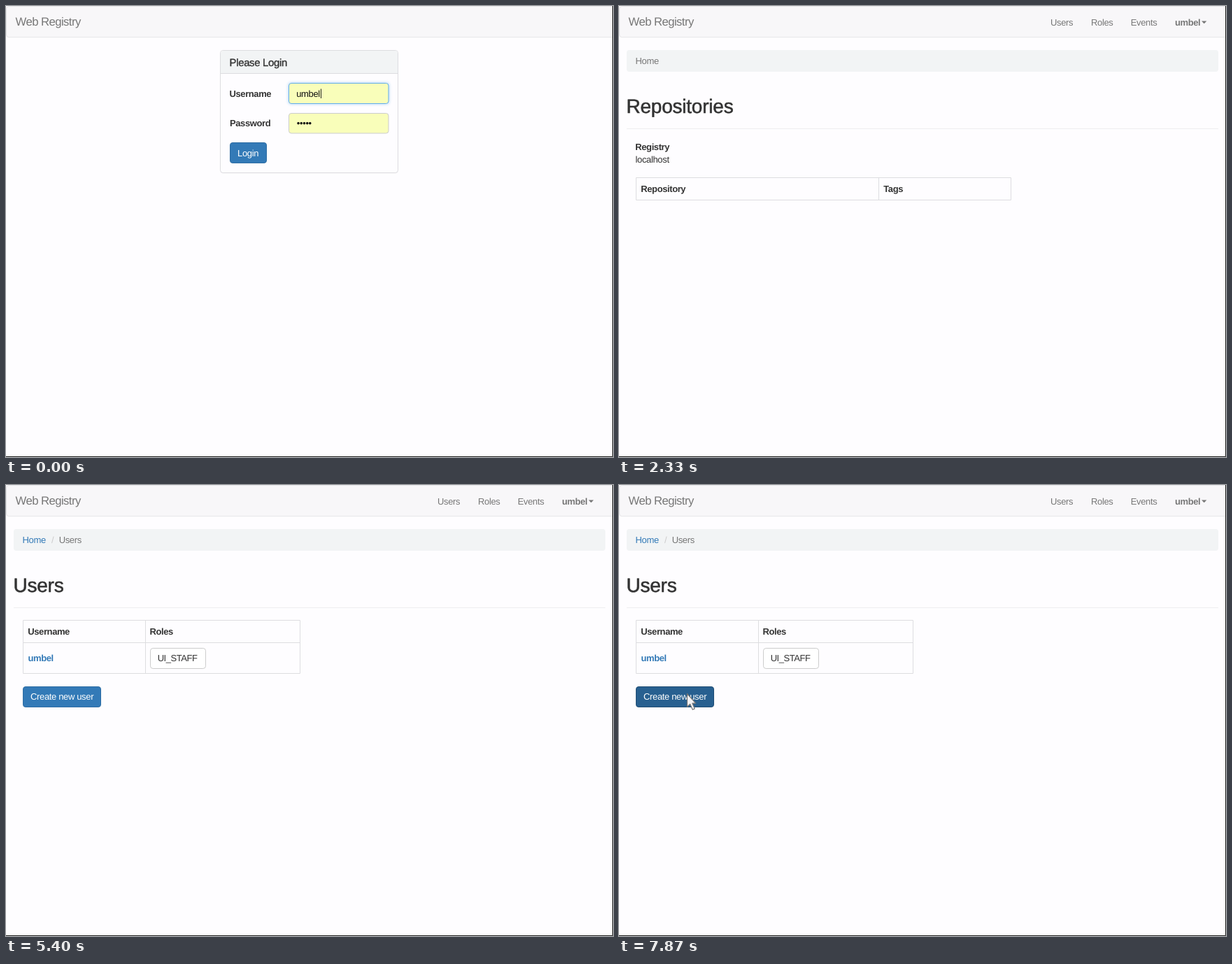
Animation, 868 px wide and 645 px high, one loop 8000 ms. Source, as an HTML page:

```html
<!DOCTYPE html>
<html lang="en">
<head>
<meta charset="utf-8">
<title>Web Registry</title>
<style>
  html, body { margin: 0; width: 100%; height: 100%; overflow: hidden; background: #fefdff; }
  svg { display: block; width: 868px; height: 645px; }
  text {
    font: 13px "Liberation Sans", Arial, sans-serif;
    letter-spacing: -.027em;
    fill: #333;
    white-space: pre;
    text-rendering: geometricPrecision;
  }
  .b { font-weight: bold; letter-spacing: -.031em; }
  .brand { font-size: 16.7px; letter-spacing: -.033em; }
  .head { font-size: 14.9px; letter-spacing: -.02em; stroke: #333; stroke-width: .35; }
  .title { font-size: 28px; letter-spacing: -.008em; stroke: #333; stroke-width: .55; }
  .gray { fill: #777; }
  .sep { fill: #ccc; }
  .link { fill: #337ab7; }
  .white { fill: #fff; }
  .ink { fill: #111; }
  .role { letter-spacing: -.036em; }
  .line { fill: none; stroke: #dddde0; }
  .bar { fill: #f2f4f5; }
  .btn { fill: #337ab7; stroke: #2e6da4; }
  .btn.hover { fill: #286090; stroke: #204d74; }
  .btn.press { fill: #204d74; stroke: #122b40; }
  .nav.hover { fill: #333; }
</style>
</head>
<body>
<svg id="stage" viewBox="0 0 868 645">
  <defs>
    <filter id="blur" x="-10%" y="-40%" width="120%" height="180%">
      <feGaussianBlur stdDeviation="2"/>
    </filter>
  </defs>
  <g id="nav"></g>
  <g id="login"></g>
  <g id="repos"></g>
  <g id="users"></g>
  <circle id="ring" r="17" fill="none" stroke="#333" stroke-width="2" stroke-opacity=".7"/>
  <path id="cursor" d="M.5 .5V19.2L4.7 15.3L8.2 23.3L11.3 21.9L7.9 14.2H12.7Z"
        fill="#f4f3f5" stroke="#757575" stroke-width="1.2" stroke-linejoin="round"/>
  <path d="M867.5 0V644.5H0" fill="none" stroke="#1c1c1c"/>
</svg>
<script>
const $ = id => document.getElementById(id);
const USER = "umbel";
const LOOP = 8000, TICK = 1000 / 15;

const text = (x, y, str, cls = "") => `<text x="${x}" y="${y}" class="${cls}">${str}</text>`;
const rect = (x, y, w, h, attrs, r = 0) =>
  `<rect x="${x}" y="${y}" width="${w}" height="${h}" rx="${r}" ${attrs}/>`;
const path = (d, attrs = 'class="line"') => `<path d="${d}" ${attrs}/>`;
const button = (id, x, y, w, label, baseline) =>
  rect(x, y, w, 29, `id="${id}" class="btn"`, 3.5) + text(x + 10.5, baseline, label, "white");

const trail = '<g>' + rect(11, 63, 846, 31, 'class="bar"', 3.7) + '</g>';
const rule = path("M11 175.5H857", 'stroke="#eeeef0"');

$("nav").innerHTML =
  rect(.5, .5, 880, 44.2, 'fill="#f8f7f9" stroke="#e6e6e8"', 3.7) +
  text(13.5, 28, "Web Registry", "brand gray") +
  '<g id="menu">' +
    '<g id="navUsers">' + text(617, 27.5, "Users", "gray nav") + '</g>' +
    text(675, 27.5, "Roles", "gray") +
    text(731.7, 27.5, "Events", "gray") +
    text(795, 27.5, USER, "b gray") +
    path("M833 21.5H840.4L836.7 25.3Z", 'fill="#777"') +
  '</g>';

$("login").innerHTML =
  rect(306.5, 64.5, 254, 175, 'fill="#000" opacity=".04"', 3.7) +
  rect(306.5, 63.5, 254, 175, 'fill="#fefdff" stroke="#dddde0"', 3.7) +
  path("M307 96V67Q307 64 310 64H557Q560 64 560 67V96Z", 'class="bar"') +
  path("M307 96.5H560") +
  text(319.5, 85.5, "Please Login", "head") +
  text(319.5, 129.5, "Username", "b") +
  text(320, 172, "Password", "b") +
  rect(404, 110, 143.5, 30, 'id="glow" fill="#66afe9" opacity=".6" filter="url(#blur)"', 4) +
  rect(404.5, 110.5, 142.5, 29, 'id="field" fill="#f9feba"', 3.5) +
  rect(404.5, 153.5, 142.5, 28.5, 'fill="#f9feba" stroke="#ccc"', 3.5) +
  text(415.2, 129.5, USER, "ink") +
  text(415.8, 172, "•••••", "ink") +
  path("M450.5 118.5V132", 'id="caret" stroke="#222"') +
  button("loginBtn", 320.5, 195.5, 52, "Login", 214.5);

$("repos").innerHTML = trail + rule +
  text(23.5, 83, "Home", "gray") +
  text(10.5, 153, "Repositories", "title") +
  text(23.3, 206, "Registry", "b") +
  text(23.5, 223.5, "localhost") +
  path("M24.5 245.5H560.5V277.5H24.5ZM371.5 245.5V277.5") +
  text(31.3, 266, "Repository", "b") +
  text(378.3, 266, "Tags", "b");

$("users").innerHTML = trail + rule +
  text(23.5, 83, "Home", "link") +
  text(65, 83, "/", "sep") +
  text(75.7, 83, "Users", "gray") +
  text(10.5, 153, "Users", "title") +
  path("M24.5 193.5H420.5V269.5H24.5ZM24.5 225.5H420.5M199.5 193.5V269.5") +
  text(31.3, 214, "Username", "b") +
  text(205.5, 214, "Roles", "b") +
  text(31.5, 252, USER, "b link") +
  rect(206.5, 233.5, 79, 29, 'fill="#fff" stroke="#ccc"', 3.7) +
  text(216.7, 252, "UI_STAFF", "role") +
  button("createBtn", 24.5, 288.5, 111, "Create new user", 307);

// Pointer stops: time, x, y
const STOPS = [
  [133, 425, 324], [933, 345, 214], [1267, 345, 214], [1467, 350, 207],
  [3067, 350, 207], [3930, 595, 60.5], [4200, 595, 60.5], [4467, 633, 21],
  [5933, 633, 21], [6530, 140, 246], [6730, 132, 257],
  [7000, 132, 257], [7530, 100, 296], [7600, 100, 296], [7867, 97, 298]
];
const SHOWN = [[200, 1870], [3130, 5400], [5670, LOOP]];
const CLICKS = [[1530, 1600], [4930, 5000]];

const within = (t, spans) => spans.some(([a, b]) => t >= a && t < b);
const ease = p => 1 - (1 - p) ** 2 * (1 + .6 * p);
const show = (id, on) => $(id).setAttribute("visibility", on ? "visible" : "hidden");

function pointerAt(t) {
  const i = STOPS.findIndex(s => s[0] > t);
  if (i === 0) return STOPS[0].slice(1);
  if (i < 0) return STOPS[STOPS.length - 1].slice(1);
  const [t0, x0, y0] = STOPS[i - 1], [t1, x1, y1] = STOPS[i];
  const p = ease((t - t0) / (t1 - t0));
  return [x0 + (x1 - x0) * p, y0 + (y1 - y0) * p];
}

function draw(t) {
  const stepped = Math.floor((t + 5) / TICK) * TICK;
  const [x, y] = pointerAt(stepped);
  const over = (l, top, r, b) => x >= l && x <= r && y >= top && y <= b;
  const visible = within(t, SHOWN), click = within(t, CLICKS);
  const page = t < 2330 ? "login" : t < 5400 ? "repos" : "users";

  for (const id of ["login", "repos", "users"]) {
    $(id).style.display = id === page ? "" : "none";
  }
  $("menu").style.display = page === "login" ? "none" : "";

  const focused = t < 1530;
  show("glow", focused);
  $("field").setAttribute("stroke", focused ? "#66afe9" : "#ccc");
  show("caret", t < 200 || (t >= 700 && t < 1200));

  const onLogin = t >= 200 && over(320, 195, 373, 225);
  $("loginBtn").classList.toggle("hover", onLogin);
  $("loginBtn").classList.toggle("press", onLogin && click);
  $("createBtn").classList.toggle("hover", over(24, 288, 136, 318));
  $("navUsers").firstChild.classList.toggle("hover", visible && over(604, 1, 663, 45));

  show("cursor", visible);
  show("ring", click);
  $("cursor").setAttribute("transform", `translate(${x} ${y})`);
  $("ring").setAttribute("cx", x);
  $("ring").setAttribute("cy", y);
}

function loop() {
  draw(performance.now() % LOOP);
  requestAnimationFrame(loop);
}
loop();
</script>
</body>
</html>
```
